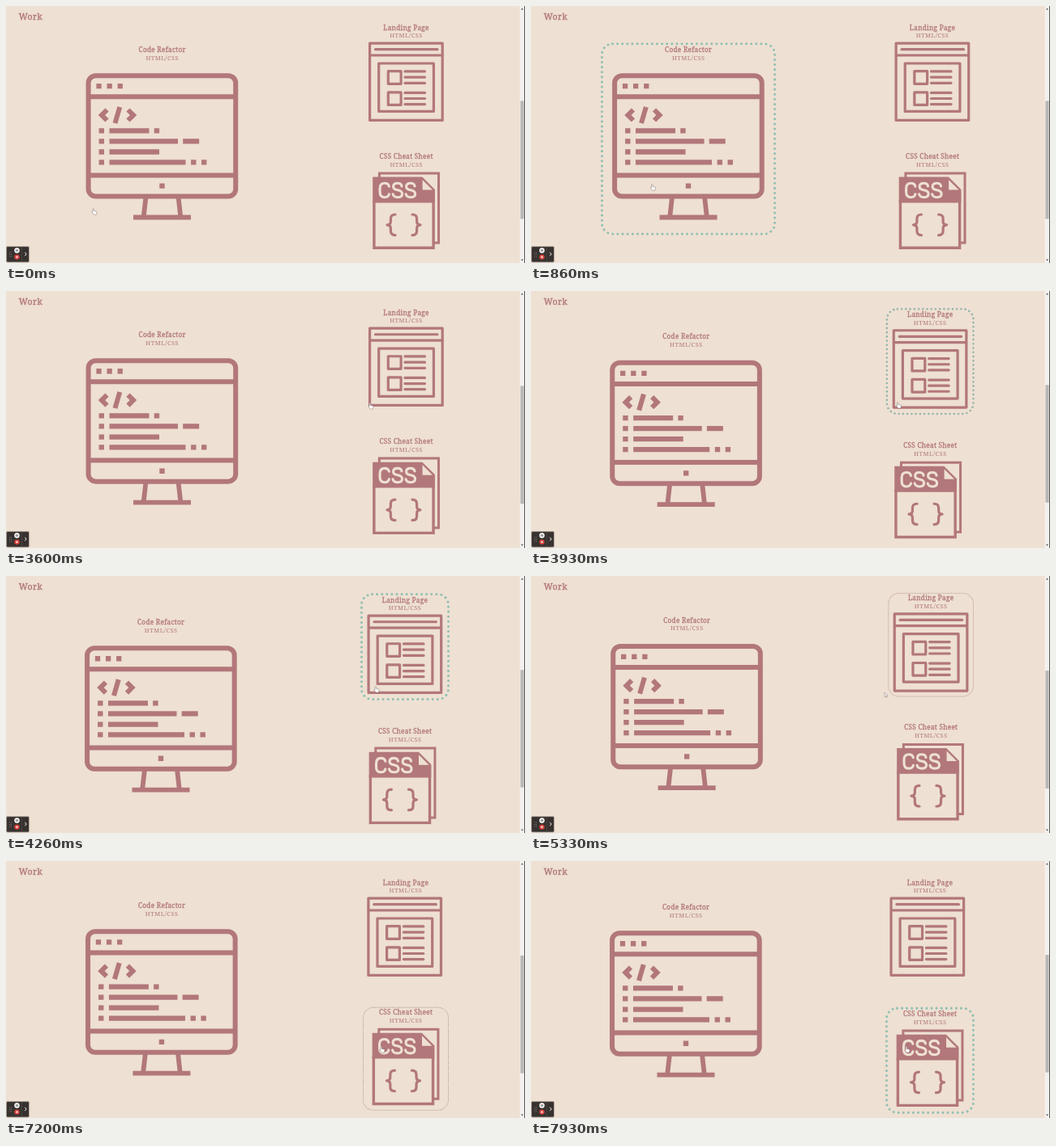
Animation, 640 px wide and 318 px high, one loop 8 s. Source, as an HTML page:

```html
<!DOCTYPE html>
<html lang="en">
<head>
<meta charset="utf-8">
<title>Work</title>
<style>
  html, body { margin: 0; width: 100%; height: 100%; overflow: hidden; background: #eee0d2; }
  svg { display: block; width: 100vw; height: 100vh; }
  text { font-family: "Noto Serif", "Liberation Serif", serif; fill: #b2777b; }
  .title { font-size: 8.2px; letter-spacing: .3px; stroke: #b2777b; stroke-width: .3; text-anchor: middle; }
  .sub { font-size: 7.4px; letter-spacing: .5px; text-anchor: middle; }
  .work { font-size: 10.6px; letter-spacing: .35px; stroke: #b2777b; stroke-width: .35; }
  .line { fill: none; stroke: #b2777b; }
  .fill { fill: #b2777b; }
  .light { fill: none; stroke: #eee0d2; stroke-width: 3.1; stroke-linecap: round; }
  .round { stroke-linecap: round; stroke-linejoin: round; }
  .ring { fill: none; stroke-linecap: round; }
</style>
</head>
<body>
<svg viewBox="0 0 640 318" preserveAspectRatio="none">
  <rect width="640" height="318" fill="#eee0d2"/>
  <text class="work" x="15.8" y="17.3">Work</text>

  <g class="label">
    <text class="title" x="192.6" y="56.8">Code Refactor</text>
    <text class="sub" x="192.7" y="66.6">HTML/CSS</text>
  </g>
  <g class="icon">
    <g class="line" stroke-width="6">
      <rect x="101.6" y="86.2" width="181.6" height="149.4" rx="9"/>
      <path d="M101 112.3H284M101 209.4H284"/>
      <path d="M124.5 128.5L118 135l6.5 6.5M150.5 128.5L157 135l-6.5 6.5M140.3 125l-5.8 20"/>
      <path d="M172.4 237l-2.6 23M212.6 237l2.6 23M157 261.5h71" stroke-width="5.8"/>
    </g>
    <path class="line" stroke-width="6.3" d="M111.4 99.2h6.3m6.8 0h6.3m6.8 0h6.3
      M114.6 154.4h6.4m6.5 0h49m6.2 0h6.4
      M114.6 167.4h6.4m6.5 0H212m6.2 0h20
      M114.6 180.5h6.4m6.5 0H189
      M114.6 193.4h6.4m6.5 0h94m6.6 0h6.4m6.5 0h6.4
      M189.3 222.7h6.4"/>
  </g>

  <g class="label">
    <text class="title" x="493.5" y="29.5">Landing Page</text>
    <text class="sub" x="493.5" y="39.4">HTML/CSS</text>
  </g>
  <g class="icon line round" stroke-width="3.2">
    <rect x="448.6" y="46.1" width="89.6" height="95.3"/>
    <rect x="459.7" y="71" width="67.7" height="59.4"/>
    <rect x="471.3" y="80.7" width="15.8" height="15.6"/>
    <rect x="471.3" y="106.8" width="15.8" height="15.6"/>
    <path d="M449 61h89M455.5 53.7h76.5M492 80.9h24.5M492 88.1h24.5M492 95.3h24.5M492 107.4h24.5M492 114.5h24.5M492 121.6h24.5"/>
  </g>

  <g class="label">
    <text class="title" x="493.6" y="188.5">CSS Cheat Sheet</text>
    <text class="sub" x="493.7" y="198.5">HTML/CSS</text>
  </g>
  <g class="icon">
    <g class="line" stroke-width="3">
      <path d="M460.4 213V207H533.5V293H527"/>
      <path d="M453.9 240V299.3H527.1V228" stroke-width="3.4"/>
      <path class="round" stroke-width="3.2" d="M480 258q-5.6 0-5.6 5v3.4q0 4-4.4 4.4q4.4.4 4.4 4.4v3.4q0 5 5.6 5M501 258q5.6 0 5.6 5v3.4q0 4 4.4 4.4q-4.4.4-4.4 4.4v3.4q0 5-5.6 5"/>
    </g>
    <path class="fill" d="M452.2 211.6H513.4L528.8 227V243.4H452.2z"/>
    <path fill="#eee0d2" d="M513.6 215.2V227.6H526z"/>
    <path class="light" d="M472.4 223.2q-.8-3.9-5.4-3.9q-5.9 0-5.9 6.4v4.6q0 6.4 5.9 6.4q4.6 0 5.4-3.9"/>
    <path id="ess" class="light" d="M488 223q-.6-3.7-5.2-3.7q-5.2 0-5.2 4.2q0 3.2 5.3 4.2q5.7 1 5.7 4.6q0 4.4-5.5 4.4q-5.2 0-6-3.9"/>
    <use href="#ess" x="16"/>
  </g>

  <rect class="ring"/><rect class="ring"/><rect class="ring"/>

  <rect x="633.6" width="6.4" height="318" fill="#f3f1f0"/>
  <rect id="thumb" x="634.4" width="4.2" fill="#b9b7b6"/>
  <path d="M635 4.6l1.5-2 1.5 2zM635 313.6l1.5 2 1.5-2z" fill="#555"/>
  <rect x="639.1" width=".9" height="318" fill="#4b4644"/>

  <rect x=".5" y="297.6" width="28" height="19.4" rx="1.4" fill="#37322f" stroke="#b5aaa0" stroke-width=".8"/>
  <path d="M19.4 298.5v17.6" stroke="#5a5552" stroke-width=".5"/>
  <path d="M4.6 304.6v6M6.6 304.6v6" stroke="#aaa" stroke-width=".8" stroke-dasharray=".8 1.7"/>
  <circle cx="13.5" cy="302.5" r="3.2" fill="#fff"/>
  <path d="M12.7 301.1v2.8M14.3 301.1v2.8" stroke="#37322f" stroke-width=".8"/>
  <circle cx="13.5" cy="310.6" r="3.2" fill="#d9413c"/>
  <rect x="12.5" y="309.6" width="2" height="2" fill="#fff"/>
  <path d="M23.2 304.8l2 2.2-2 2.2" fill="none" stroke="#fff" stroke-width=".9"/>

  <g id="cursor" fill="#fff" stroke="#6b625f" stroke-width=".45" stroke-linejoin="round">
    <path id="hand" d="M0 .9q.7-1.3 1.4 0v2.4l2.9.7q.8.3.7 1.2l-.6 2.9H1.2l-2.5-3.1q.2-.9 1.3-.1z"/>
    <path id="arrow" d="M0 0v5.4l1.2-1.1 1 2 .9-.4-.9-2h1.6z"/>
  </g>
</svg>
<script>
const LOOP = 8000, FADE = 600, BORDER = 3.05, RADIUS = 13;
const $ = id => document.getElementById(id);
const all = selector => document.querySelectorAll(selector);
const labels = all('.label'), icons = all('.icon'), rings = all('.ring');
const cards = [
  { box: [87.5, 48.3, 210, 232.2], from: 0, to: 2300 },
  { box: [441.5, 21, 104, 127], from: 3590, to: 5050 },
  { box: [441.5, 180.6, 104, 126], from: 7060, to: Infinity }
];
// time, x, y
const path = [
  [0, 107, 250], [60, 108, 250], [860, 148.5, 220], [1700, 205, 192], [2300, 302, 170],
  [3000, 418, 158], [3600, 448, 138], [4260, 455, 136], [4700, 461, 131],
  [5050, 438, 142], [5930, 432, 149], [6130, 432, 152], [6930, 441, 222],
  [7060, 452, 228], [7200, 462, 229], [LOOP, 462, 229]
];

const clamp = v => Math.max(0, Math.min(1, v));
const mix = (a, b, p) => a + (b - a) * p;
const move = (el, x, y) => el.setAttribute('transform', `translate(${x} ${y})`);

// cubic-bezier(.25, .1, .25, 1)
function ease(x) {
  const curve = (a, b, u) => 3 * a * u * (1 - u) ** 2 + 3 * b * u * u * (1 - u) + u ** 3;
  let lo = 0, hi = 1;
  for (let i = 0; i < 20; i++) {
    const mid = (lo + hi) / 2;
    if (curve(.25, .25, mid) < x) lo = mid; else hi = mid;
  }
  return curve(.1, 1, hi);
}

const hover = (c, t) => ease(clamp((t - c.from) / FADE)) - ease(clamp((t - c.to) / FADE));

function drawRing(ring, [x, y, w, h], dx, dy, p) {
  const b = p * BORDER;
  ring.style.display = b < .3 ? 'none' : '';
  if (b < .3) return;
  const bw = w + b, bh = h + b;
  const length = 2 * (bw + bh) - (8 - 2 * Math.PI) * RADIUS;
  const step = length / Math.round(length / (2 * b));
  const color = [[178, 143], [119, 192], [123, 180]].map(([a, z]) => Math.round(mix(a, z, p)));
  const attrs = {
    x: x + dx - b / 2, y: y + dy - b / 2, width: bw, height: bh, rx: RADIUS,
    stroke: `rgb(${color})`, 'stroke-width': b, 'stroke-dasharray': `0 ${step}`
  };
  for (const k in attrs) ring.setAttribute(k, attrs[k]);
}

function draw(t) {
  const p = cards.map(c => hover(c, t));
  const [a, b, c] = p.map(v => v * BORDER);
  // growing borders push the layout around: labels stay centred in the column,
  // icons keep to the left edge of their card
  const centre = (a - b - c) / 2;
  const left = [centre, centre - c, centre - b];
  const down = [b + c, b, 2 * b + c];
  cards.forEach((card, i) => {
    move(labels[i], centre, down[i]);
    move(icons[i], left[i], down[i]);
    drawRing(rings[i], card.box, left[i], down[i], p[i]);
  });
  $('thumb').setAttribute('y', 117.4 - .4 * (b + c));
  $('thumb').setAttribute('height', 146 - .2 * (b + c));

  const i = path.findIndex(k => k[0] > t);
  const [t0, x0, y0] = path[i - 1], [t1, x1, y1] = path[i];
  const q = (t - t0) / (t1 - t0);
  move($('cursor'), mix(x0, x1, q), mix(y0, y1, q));
  const over = cards.some(k => t >= k.from && t < k.to);
  $('hand').style.display = over ? '' : 'none';
  $('arrow').style.display = over ? 'none' : '';
}

const start = performance.now();
function tick() {
  draw((performance.now() - start) % LOOP);
  requestAnimationFrame(tick);
}
tick();
</script>
</body>
</html>
```
